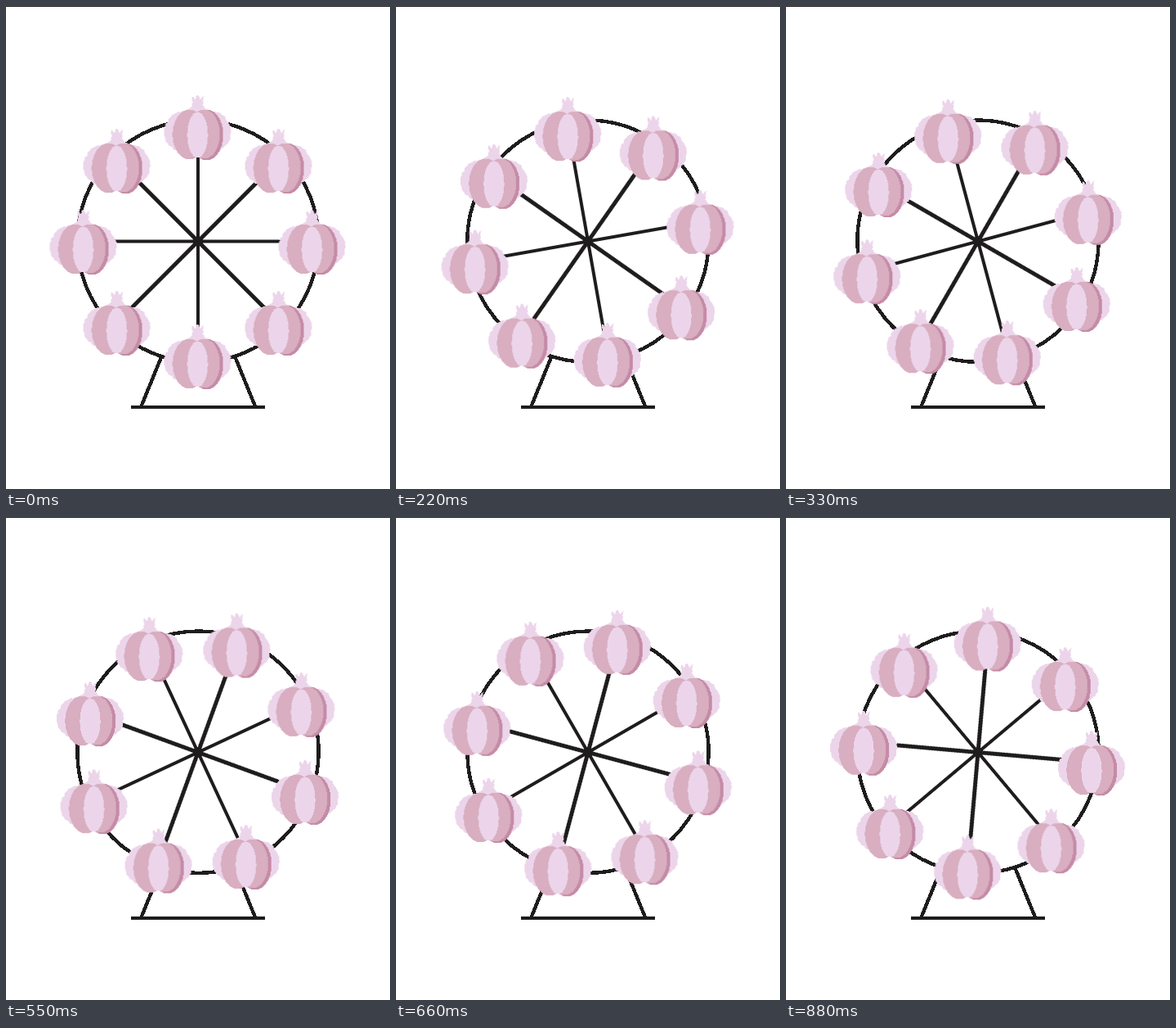
Animation, 470 px wide and 590 px high, one loop 990 ms. Source, as an HTML page:

```html
<!DOCTYPE html>
<html lang="en">
<head>
<meta charset="utf-8">
<title>Garlic wheel</title>
<style>
  html, body { margin: 0; width: 100%; height: 100%; overflow: hidden; background: #fff; }
  svg { display: block; width: 470px; height: 590px; shape-rendering: crispEdges; }
  .frame { fill: none; stroke: #1e1c1c; stroke-width: 4.4; }
  .spokes { animation: turn 990ms steps(9, end) infinite; }
  .cabin { animation: ride 990ms steps(9, end) infinite; }
  .light { fill: #ecd5ea; }
  .mid { fill: #d8aec0; }
  .dark { fill: #c58ba6; }
  .skin { stroke: #ecd5ea; stroke-dasharray: 4 3; }
  @keyframes turn { to { transform: rotate(-45deg); } }
  @keyframes ride {
    from { transform: rotate(var(--a)) translate(140px, 0) rotate(calc(-1 * var(--a))); }
    to { transform: rotate(calc(var(--a) - 45deg)) translate(140px, 0) rotate(calc(45deg - var(--a))); }
  }
</style>
</head>
<body>
<svg viewBox="0 0 470 590">
  <defs>
    <g id="garlic">
      <path class="light skin" d="M-7-37L-3-34L0-40L3-34L7-37L6-28C7-23 11-21 19-19
        C29-18 34-13 36-7C40-3 42 4 40 11C40 17 36 21 32 24C29 28 22 31 14 31H-14
        C-22 31-29 28-32 24C-36 21-40 17-40 11C-42 4-40-3-36-7C-34-13-29-18-19-19
        C-11-21-7-23-6-28Z"/>
      <ellipse class="dark" cx="11" cy="9.500" rx="20.500" ry="31"/>
      <ellipse class="mid" cx="8" cy="8.500" rx="19.500" ry="30"/>
      <ellipse class="mid" cx="-10" cy="9" rx="20.700" ry="30.500"/>
      <ellipse class="light" cx="0" cy="9.500" rx="12.600" ry="28"/>
    </g>
  </defs>
  <rect width="470" height="1" fill="#1e1c1c"/>
  <g class="frame">
    <path d="M153 490H317M165.500 489L190 429M305 489L280.500 429"/>
    <circle cx="235" cy="287.200" r="147.700"/>
    <g transform="translate(235 287.500)">
      <path class="spokes" d="M-140 0H140M0-140V140M-99-99L99 99M-99 99L99-99"/>
    </g>
  </g>
  <g id="cabins" transform="translate(234.500 288)"></g>
</svg>
<script>
  const cabins = document.getElementById('cabins');
  for (let i = 0; i < 8; i++) {
    const cabin = document.createElementNS('http://www.w3.org/2000/svg', 'use');
    cabin.setAttribute('href', '#garlic');
    cabin.setAttribute('class', 'cabin');
    cabin.style.setProperty('--a', `${i * 45}deg`);
    cabins.append(cabin);
  }
</script>
</body>
</html>
```
